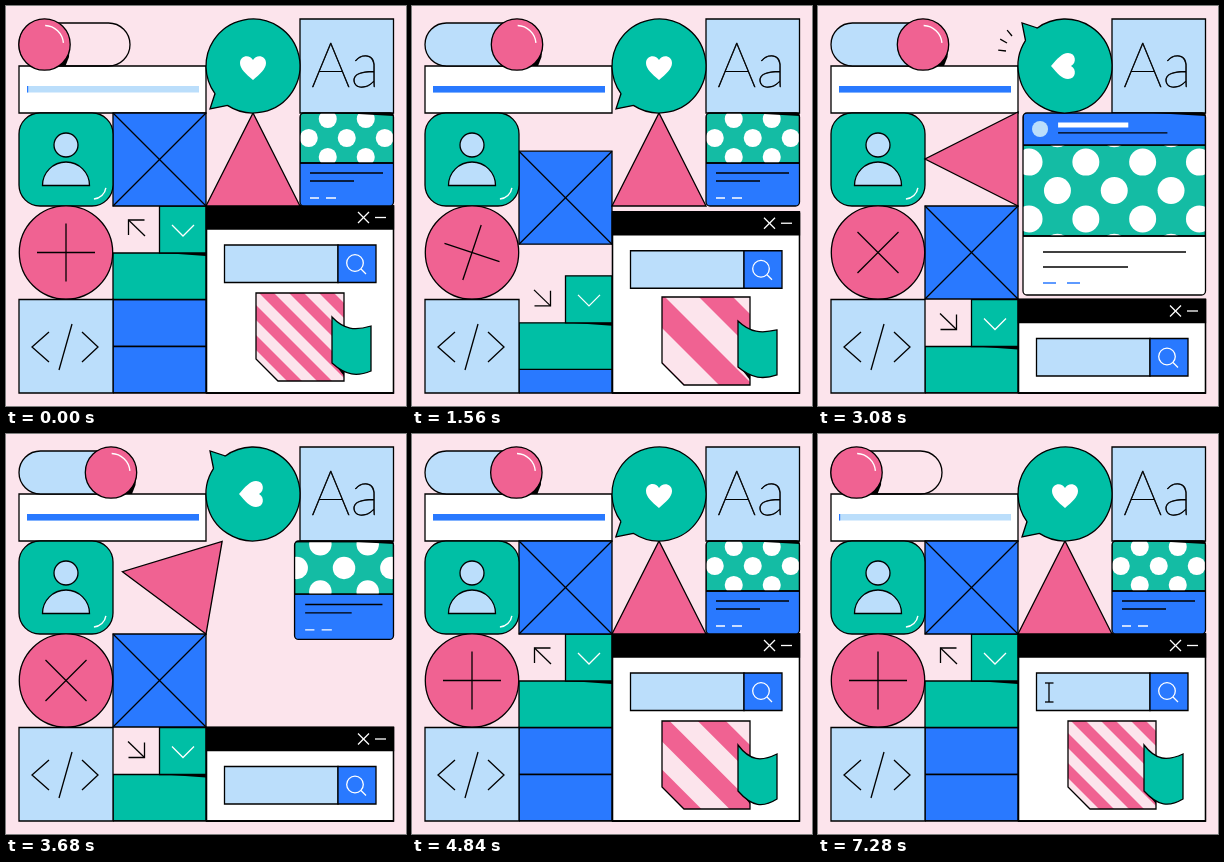
An HTML page with a canvas that plays this animation: 400 by 400 pixels, repeating every 7.32 s.

```html
<!DOCTYPE html>
<html lang="en">
<meta charset="utf-8">
<title>Interface blocks</title>
<style>
html, body { margin: 0; width: 100%; height: 100%; overflow: hidden; background: #fce4ec; }
canvas { display: block; width: 400px; height: 400px; }
</style>
<canvas id="stage" width="400" height="400"></canvas>
<script>
const c = document.getElementById('stage').getContext('2d');
const LOOP = 7320, TAU = Math.PI * 2, DEG = Math.PI / 180;
const BG = '#fce4ec', PINK = '#f06292', GREEN = '#00bfa5', BLUE = '#2979ff', SKY = '#bbdefb';
const DOTTED = '#14bca4';

const lerp = (a, b, k) => a + (b - a) * k;
const clamp = u => Math.max(0, Math.min(1, u));
const quad = u => u < .5 ? 2 * u * u : 1 - 2 * (1 - u) ** 2;
const cubic = u => u < .5 ? 4 * u ** 3 : 1 - 4 * (1 - u) ** 3;
const ramp = (t, start, dur, ease = cubic) => ease(clamp((t - start) / dur));
// 0 -> 1 -> 0 over the loop
const swing = (t, out, outDur, back, backDur) => ramp(t, out, outDur) - ramp(t, back, backDur);
const mix = (a, b, k) => `rgb(${a.map((v, i) => Math.round(lerp(v, b[i], k)))})`;

function paint(fill, stroke = '#000', width = 1.3) {
  if (fill) { c.fillStyle = fill; c.fill(); }
  if (stroke) { c.strokeStyle = stroke; c.lineWidth = width; c.stroke(); }
}
function rect(x, y, w, h, fill, stroke, r = 0) {
  c.beginPath();
  c.roundRect(x, y, w, h, r);
  paint(fill, stroke);
}
function disc(x, y, r, fill, stroke) {
  c.beginPath();
  c.arc(x, y, r, 0, TAU);
  paint(fill, stroke);
}
function trace(points) {
  c.beginPath();
  for (let i = 0; i < points.length; i += 2) c.lineTo(points[i], points[i + 1]);
}
function poly(points, fill, stroke) {
  trace(points);
  c.closePath();
  paint(fill, stroke);
}
function line(points, stroke = '#000', width = 1.3) {
  trace(points);
  paint(null, stroke, width);
}
function arc(x, y, r, from, to, stroke) {
  c.beginPath();
  c.arc(x, y, r, from * DEG, to * DEG);
  paint(null, stroke, 1.4);
}
function group(x, y, angle, draw) {
  c.save();
  c.translate(x, y);
  c.rotate(angle * DEG);
  draw();
  c.restore();
}
function clipped(x, y, w, h, r, draw) {
  c.save();
  c.beginPath();
  c.roundRect(x, y, w, h, r);
  c.clip();
  draw();
  c.restore();
}

function toggle(t) {
  const x = lerp(38.5, 105, swing(t, 60, 640, 4760, 600));
  clipped(13, 17, 111, 43, 21.5, () => rect(13, 17, x - 13, 43, SKY, null));
  rect(13, 17, 111, 43, null, '#000', 21.5);
  poly([x + 25, 43, x + 24.5, 51, x + 21, 60, x + 8, 60], '#000', null);
  disc(x, 38.5, 25.7, PINK);
  arc(x, 38.5, 19, -88, -5, '#fff');
}

function progress(t) {
  rect(13, 60, 187, 47, '#fff');
  rect(21, 80, 172, 6.5, SKY, null);
  const k = ramp(t, 40, 800) - ramp(t, 5360, 1840, quad);
  rect(21, 80, Math.max(1.2, 172 * k), 6.5, BLUE, null);
}

function avatar() {
  rect(13, 107, 94, 93, GREEN, '#000', 21);
  disc(60, 139, 12, SKY);
  c.beginPath();
  c.arc(60, 179.5, 23.5, Math.PI, TAU);
  c.closePath();
  paint(SKY);
  arc(87, 180, 13, 8, 86, '#fff');
}

function plus(t) {
  disc(60, 246.5, 46.7, PINK);
  group(60, 246.5, 45 * swing(t, 1280, 600, 4054, 700), () => {
    line([-29, 0, 29, 0]);
    line([0, -29, 0, 29]);
  });
}

function code() {
  rect(13, 293.5, 94, 93.5, SKY);
  line([43, 326, 26, 341, 43, 356]);
  line([76, 326, 92, 341, 76, 356]);
  line([66, 318, 53, 364]);
}

function stack(t) {
  const y = 93.5 * swing(t, 1200, 600, 4120, 700);
  group(0, y, 0, () => {
    rect(107, 293.5, 93, 47, BLUE);
    rect(107, 340.5, 93, 46.5, BLUE);
    rect(107, 247, 93, 46.5, GREEN);
    poly([158, 247, 200, 247, 200, 250], '#000', null);
    rect(153.5, 200, 46.5, 47, GREEN);
    line([166, 219, 177, 230, 188, 219], '#fff');
    const turn = ramp(t, 560, 520) + ramp(t, 3800, 480);
    group(130.5, 222, 180 * turn, () => {
      line([8.5, 8, -8, -8]);
      line([-8, 7, -8, -8, 8, -8]);
    });
  });
}

function crossBox(t) {
  const y = 107 + 93 * swing(t, 1280, 600, 4065, 700);
  rect(107, y, 93, 93, BLUE);
  line([107, y, 200, y + 93]);
  line([200, y, 107, y + 93]);
}

function stripes(k) {
  const w = lerp(15, 34, k), start = lerp(253, 219, k);
  const page = [250, 287, 338, 287, 338, 375, 272, 375, 250, 353];
  poly(page, BG, null);
  c.save();
  c.clip();
  for (let i = -4; i < 4; i++) {
    const x = start + i * 2 * w;
    poly([x, 287, x + w, 287, x + w + 90, 377, x + 90, 377], PINK, null);
  }
  c.restore();
  poly(page, null);
}

function flag(t) {
  const wave = 8 * Math.cos(TAU * (t - 960) / 790 + .4);
  poly([327, 356, 338, 361, 338, 370], '#000', null);
  c.beginPath();
  c.moveTo(326, 311);
  c.bezierCurveTo(338, 319 + wave, 349, 320 + wave, 365, 320);
  c.lineTo(365, 365);
  c.bezierCurveTo(351, 366 + wave, 340, 365 + wave, 326, 357);
  c.closePath();
  paint(GREEN);
}

function windowBox(t) {
  const move = (lag, dist) => dist * swing(t, 1400 + lag, 600, 3933 + lag, 700);
  const y = move(0, 93.5), bar = move(12, 93.5);
  rect(200.5, 200 + y, 187, 187 - y, '#fff');
  clipped(199, 199, 190, 188, 0, () => {
    group(0, bar, 0, () => {
      rect(200.5, 200, 187, 23, '#000');
      line([352, 206, 363, 217], '#fff');
      line([363, 206, 352, 217], '#fff');
      line([369, 211.5, 380, 211.5], '#fff');
      rect(218.5, 239, 113.5, 37.5, SKY);
      rect(332, 239, 38, 37.5, BLUE);
      disc(349, 257, 8.3, null, '#fff');
      line([355, 263, 360, 268], '#fff');
      if (t > 4200 && (t - 4200) % 1000 < 500) {
        line([231, 249, 231, 268]);
        line([227, 249, 235.5, 249]);
        line([227, 268, 235.5, 268]);
      }
    });
    group(0, move(36, 110), 0, () => {
      stripes(swing(t, 100, 800, 4500, 800));
      flag(t);
    });
  });
  rect(200.5, 200 + y, 187, 187 - y, null);
  line([107, 387, 387.5, 387]);
}

function dots(points) {
  for (let i = 0; i < points.length; i += 2) disc(points[i], points[i + 1], .8, '#000', null);
}

function triangle(t) {
  group(200, 200, -90 * swing(t, 1700, 640, 3500, 600), () =>
    poly([0, 0, 47, -93, 94, 0], PINK));
  if (t > 2080 && t < 2360) dots([114, 175, 122, 184, 131, 189]);
  if (t > 4080 && t < 4440) dots([270, 119, 272.5, 125, 277, 132]);
}

function bubble(t) {
  group(247, 60, 90 * swing(t, 1729, 800, 4110, 800), () => {
    c.beginPath();
    c.moveTo(-38, 27.5);
    c.lineTo(-43, 43);
    c.lineTo(-25.5, 39.5);
    c.arc(0, 0, 47, 123 * DEG, -216 * DEG, true);
    c.closePath();
    paint(GREEN);
    c.beginPath();
    c.moveTo(0, 14);
    c.bezierCurveTo(-7, 8, -13, 3, -13, -3);
    c.bezierCurveTo(-13, -11, -3, -12, 0, -6);
    c.bezierCurveTo(3, -12, 13, -11, 13, -3);
    c.bezierCurveTo(13, 3, 7, 8, 0, 14);
    paint('#fff', null);
  });
  if (t < 500 || t > 6800) return;
  const k = Math.cos(TAU * (t - 920) / 1060);
  if (k > .06) {
    const ray = (x, y, dx, dy) => line([x, y, x + dx * k, y + dy * k]);
    ray(188, 45, -8, -1);
    ray(189, 37, -7, -4);
    ray(194, 30, -5, -6);
  } else if (t > 5520) dots([188.5, 43, 190, 36, 193, 28.5]);
}

function letters() {
  rect(294, 13, 93.5, 94, SKY);
  c.fillStyle = c.strokeStyle = '#000';
  c.lineWidth = .6;
  c.textAlign = 'center';
  c.font = '100 62px Lato, Roboto, sans-serif';
  c.fillText('Aa', 339.5, 80.5);
  c.strokeText('Aa', 339.5, 80.5);
}

function card(t) {
  const k = swing(t, 1800, 640, 3260, 560);
  const x = lerp(294, 205, k), w = 387.5 - x, h = lerp(93, 182, k), s = w / 182;
  const head = 107 + 32 * k ** 1.4, body = head + lerp(50, 91, k);
  const cx = x + w / 2, cy = (head + body) / 2, step = 19 + 9.4 * k ** .25;
  const blue = [41, 121, 255], white = [255, 255, 255], fade = k ** 1.8;
  const at = (a, b) => lerp(a, b, k);
  clipped(x, 107, w, h, 4, () => {
    rect(x, 107, w, h, mix(blue, white, fade), null);
    rect(x, head, w, body - head, DOTTED);
    clipped(x, head, w, body - head, 0, () => {
      for (let i = -4; i <= 4; i++)
        for (let j = -2; j <= 2; j++)
          if ((i + j) % 2 === 0) disc(cx + i * step, cy + j * step, step * .475, '#fff', null);
    });
    line([x, body, x + w, body]);
    if (k > 0) {
      rect(x, 106, w, head - 106, BLUE);
      disc(x + 17 * s, head - 16 * s, 8 * s, SKY, null);
      line([x + 35 * s, head - 20 * s, x + 105 * s, head - 20 * s], '#fff', 5 * s);
      line([x + 35 * s, head - 12 * s, x + 144 * s, head - 12 * s]);
    }
    const left = x + at(10, 20), tint = mix(white, blue, fade);
    line([left, body + at(10, 16), x + at(83, 163), body + at(10, 16)]);
    line([left, body + at(18, 31), x + at(54, 105), body + at(18, 31)]);
    const y = body + at(35, 47);
    line([left, y, left + at(9, 13), y], tint);
    line([x + at(26, 44), y, x + at(36, 57), y], tint);
  });
  rect(x, 107, w, h, null, '#000', 4);
  poly([335, 107, 387.5, 107, 387.5, 110], '#000', null);
}

function frame(now) {
  const t = now % LOOP;
  c.fillStyle = BG;
  c.fillRect(0, 0, 400, 400);
  progress(t);
  toggle(t);
  clipped(106, 100, 96, 287, 0, () => { stack(t); crossBox(t); });
  avatar();
  plus(t);
  code();
  windowBox(t);
  letters();
  triangle(t);
  card(t);
  bubble(t);
  requestAnimationFrame(frame);
}
requestAnimationFrame(frame);
</script>
</html>
```
